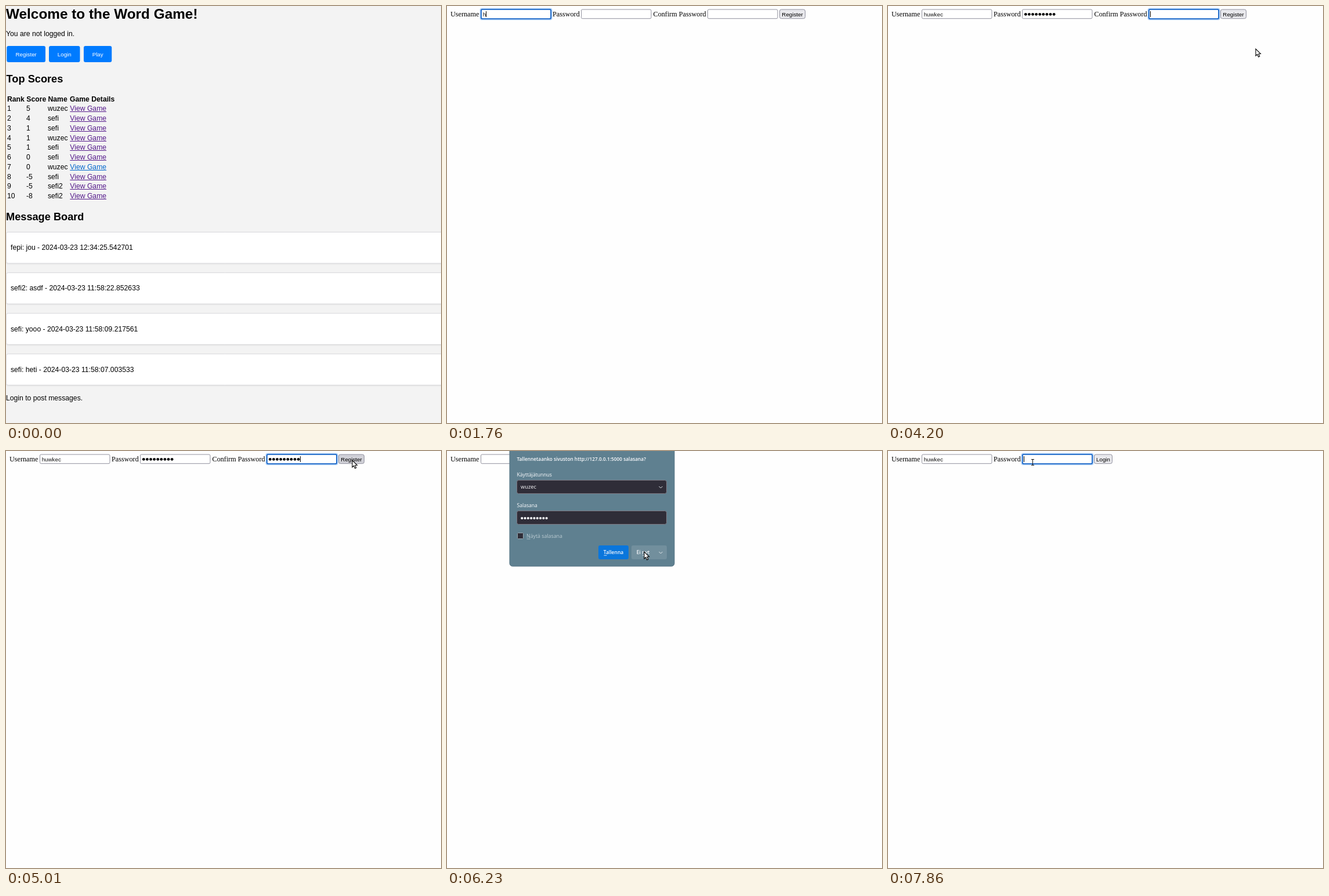
Recreate the animation shown at these times as an HTML page with a canvas. Size 750 px wide and 720 px high, loop 7990 ms.

```html
<!DOCTYPE html>
<html lang="en">
<head>
<meta charset="utf-8">
<title>Word Game</title>
<style>
html, body { margin: 0; width: 100%; height: 100%; overflow: hidden; background: #fefefe; }
canvas { display: block; }
</style>
</head>
<body>
<canvas id="stage" width="750" height="720"></canvas>
<script>
const ctx = document.getElementById('stage').getContext('2d');
const LOOP = 7990, STEP = LOOP / 59;

const sans = (px, weight = 400) => `${weight} ${px}px "Liberation Sans", Arial, sans-serif`;
const serif = px => `${px}px "Liberation Serif", "Times New Roman", serif`;
const ui = (px, weight = 400) => `${weight} ${px}px "Open Sans", "Noto Sans", sans-serif`;

const BODY = sans(12.2), BOLD = sans(12.2, 700), CONTROL = sans(9.75);
const USER = 'huwkec', SAVED = 'wuzec';
const SECRET = 9;

const scores = [
  [5, SAVED], [4, 'sefi'], [1, 'sefi'], [1, SAVED], [1, 'sefi'],
  [0, 'sefi'], [0, SAVED], [-5, 'sefi'], [-5, 'sefi2'], [-8, 'sefi2']
];
const messages = [
  'fepi: jou - 2024-03-23 12:34:25.542701',
  'sefi2: asdf - 2024-03-23 11:58:22.852633',
  'sefi: yooo - 2024-03-23 11:58:09.217561',
  'sefi: heti - 2024-03-23 11:58:07.003533'
];

// Pointer strokes as [time, x, y] stops; typing hides the pointer in between
const strokes = [
  [[140, 280, 30], [540, 40, 85], [940, 40, 85], [1210, 120, 122], [1350, 140, 16],
    [1410, 140, 16], [1620, 238, 72], [1750, 238, 72]],
  [[2430, 238, 72], [2700, 285, 16], [2760, 285, 16], [2900, 390, 76], [2970, 390, 76]],
  [[3780, 390, 76], [3980, 505, 16], [4050, 505, 16], [4200, 634, 74], [4320, 634, 74]],
  [[4730, 608, 40], [4870, 597, 16], [5600, 597, 16], [6080, 340, 174], [6260, 340, 174],
    [6500, 290, 76], [6760, 133, 23], [6800, 133, 23], [6860, 128, 16],
    [6910, 128, 16], [7030, 200, 70]],
  [[7440, 200, 70], [7700, 249, 19], [LOOP, 249, 19]]
];

function text(str, x, y, font, color = '#000', align = 'left') {
  ctx.font = font;
  ctx.fillStyle = color;
  ctx.textAlign = align;
  ctx.fillText(str, x, y);
  return ctx.measureText(str).width;
}

function box(x, y, w, h, r, fill, stroke, line = 1) {
  ctx.beginPath();
  ctx.roundRect(x, y, w, h, r);
  if (fill) {
    ctx.fillStyle = fill;
    ctx.fill();
  }
  if (stroke) {
    ctx.strokeStyle = stroke;
    ctx.lineWidth = line;
    ctx.stroke();
  }
}

function dots(count, x, y, pitch, r, color) {
  ctx.fillStyle = color;
  for (let i = 0; i < count; i++) {
    ctx.beginPath();
    ctx.arc(x + pitch * (i + 0.5), y, r, 0, 7);
    ctx.fill();
  }
}

function drawHome() {
  ctx.fillStyle = '#f3f3f3';
  ctx.fillRect(0, 0, 750, 720);
  text('Welcome to the Word Game!', 0, 22, sans(24.35, 700));
  text('You are not logged in.', 0, 52, BODY);
  for (const [label, x, w] of [['Register', 1.3, 66.7], ['Login', 74, 53.5], ['Play', 134, 48.3]]) {
    box(x, 69, w, 28, 3, '#007bff');
    text(label, x + w / 2, 87, CONTROL, '#fff', 'center');
  }

  text('Top Scores', 0.6, 132, sans(18.2, 700));
  [['Rank', 2], ['Score', 35.3], ['Name', 72.5], ['Game Details', 110]]
    .forEach(([label, x]) => text(label, x, 164.5, BOLD));
  scores.forEach(([score, name], i) => {
    const y = 181.4 + i * 16.76;
    const color = i === 6 ? '#0066cc' : '#551a8b';
    text(i + 1, 2, y, BODY);
    text(score, 35, y, BODY);
    text(name, 72, y, BODY);
    const w = text('View Game', 110.3, y, BODY, color);
    ctx.fillRect(110.3, Math.round(y + 1), w, 1);
  });

  text('Message Board', 0, 370, sans(18.2, 700));
  messages.forEach((line, i) => {
    const y = 390.5 + i * 70.1;
    ctx.save();
    ctx.shadowColor = 'rgba(0,0,0,.1)';
    ctx.shadowBlur = 3;
    ctx.shadowOffsetY = 1;
    box(0.5, y, 770, 53.7, 3, '#fff');
    ctx.restore();
    box(0.5, y, 770, 53.7, 3, null, '#d9d9dc');
    text(line, 8, y + 30.8, BODY);
  });
  text('Login to post messages.', 0, 681.3, BODY);
}

// value: a string, or a number of masked characters
function field(x, value, focused) {
  if (focused) {
    box(x - 1.6, 3.4, 125.2, 21.2, 4, '#b4d3f7');
    box(x + 0.9, 5.9, 120.2, 16.2, 2, '#fff', '#1463c6', 1.8);
  } else {
    box(x + 0.5, 6, 120.5, 15.7, 2, '#fff', '#92929e');
  }
  let end = x + 3.7;
  if (typeof value === 'number') {
    dots(value, end - 0.4, 14.3, 6.1, 2.4, '#000');
    end += value * 6.1 - 0.4;
  } else {
    end += text(value, end, 17.6, CONTROL, '#111');
  }
  if (focused) {
    ctx.fillStyle = '#000';
    ctx.fillRect(Math.round(end), 9, 1, 10);
  }
}

function button(label, x, w, hover) {
  box(x + 0.5, 6, w - 1, 15.7, 3, hover ? '#d0d0d7' : '#e9e9ed', '#8f8f9d');
  text(label, x + w / 2, 17.6, CONTROL, '#000', 'center');
}

function drawForm(user, pass, confirm, focus, hover) {
  const label = (str, x) => text(str, x, 18, serif(12.2));
  const full = confirm !== null;
  label('Username', 6);
  label('Password', 182);
  if (full) label('Confirm Password', 355.5);
  field(58, user, focus === 0);
  field(231, pass, focus === 1);
  if (full) {
    field(449, confirm, focus === 2);
    button('Register', 573, 45, hover);
  } else {
    button('Login', 355, 32, hover);
  }
}

function chevron(x, y) {
  ctx.beginPath();
  ctx.moveTo(x - 3, y - 1.5);
  ctx.lineTo(x, y + 1.5);
  ctx.lineTo(x + 3, y - 1.5);
  ctx.strokeStyle = '#e4eaed';
  ctx.lineWidth = 1;
  ctx.stroke();
}

function drawPrompt() {
  const white = '#fbfbfe', dark = '#2f2d38', dim = '#bccbd2', edge = '#7c7680';
  const rule = (x, y, w, color) => {
    ctx.fillStyle = color;
    ctx.fillRect(x, y, w, 0.8);
  };
  box(108, -10, 284, 209, 5, '#5f8090', '#547282');
  text('Tallennetaanko sivuston http://127.0.0.1:5000 salasana?', 120.5, 17, ui(8.3, 600), white);
  text('Käyttäjätunnus', 120.5, 44.3, ui(8.6), white);
  box(120.5, 50.5, 258, 23, 3, dark, edge);
  text(SAVED, 127, 65.4, ui(9.3), white);
  chevron(368.5, 62.5);
  text('Salasana', 120.5, 97.3, ui(8.6), white);
  box(120.5, 103.5, 258, 23, 3, dark, edge);
  dots(SECRET, 126.6, 116, 5.3, 2.1, white);
  box(121.5, 141.5, 10, 10, 1, dark, '#9aa9b1');
  text('Näytä salasana', 137, 150.2, ui(8.8), dim);
  rule(137.5, 151.5, 6, dim);
  box(261, 163, 52, 24, 3, '#0a76dc');
  text('Tallenna', 287, 178.4, ui(8.5, 600), white, 'center');
  rule(270.5, 179.8, 5, white);
  box(318, 163, 61, 24, 3, '#728f9d');
  text('Ei nyt', 338, 178.4, ui(8.5, 600), white, 'center');
  rule(337, 179.8, 5, white);
  chevron(368.5, 175.5);
}

function drawStatus() {
  box(-3, 712.5, 203.5, 20, 1, '#2b2a33', '#45434f');
  text('127.0.0.1', 3, 723, ui(8.8), '#fbfbfe');
}

function drawArrow(x, y) {
  const pts = [[0, 0], [0, 12], [2.7, 9.5], [4.7, 14], [6.8, 13], [4.9, 8.7], [8.5, 8.5]];
  ctx.beginPath();
  pts.forEach(([dx, dy]) => ctx.lineTo(x + dx, y + dy));
  ctx.closePath();
  ctx.fillStyle = '#fff';
  ctx.strokeStyle = '#000';
  ctx.lineWidth = 1.1;
  ctx.fill();
  ctx.stroke();
}

function drawBeam(x, y) {
  ctx.fillStyle = '#111';
  ctx.fillRect(x, y - 5, 1, 11);
  for (const dy of [-5, 5]) ctx.fillRect(x - 2, y + dy, 5, 1);
}

function drawPointer(t, fields) {
  const stops = strokes.find(s => t >= s[0][0] && t < s[s.length - 1][0]);
  if (!stops) return;
  const i = stops.findIndex(s => s[0] > t);
  const [t0, x0, y0] = stops[i - 1], [t1, x1, y1] = stops[i];
  const p = (t - t0) / (t1 - t0), k = p * p * (3 - 2 * p);
  const x = Math.round(x0 + (x1 - x0) * k), y = Math.round(y0 + (y1 - y0) * k);
  const inField = y > 5 && y < 22 && fields.some(left => x >= left && x < left + 121);
  (inField ? drawBeam : drawArrow)(x, y);
}

// Characters entered by time t
const typed = (t, start, gap, max) =>
  Math.max(0, Math.min(max, Math.floor((t - start) / gap) + 1));

// Index of the field clicked last
const lastClick = (t, clicks) => clicks.filter(c => t >= c).length - 1;

function draw(t) {
  const home = t < 805, register = !home && t < 5680, prompt = t >= 5400 && t < 6350;
  ctx.fillStyle = '#fefefe';
  ctx.fillRect(0, 0, 750, 720);
  if (home) {
    drawHome();
  } else if (register) {
    const pass = typed(t, 2970, 130, 3) + typed(t, 3370, 65, SECRET - 3);
    drawForm(USER.slice(0, typed(t, 1750, 110, 6)), pass, typed(t, 4320, 50, SECRET),
      prompt ? -1 : lastClick(t, [1350, 2700, 3980]), t >= 4860);
  } else {
    drawForm(USER.slice(0, typed(t, 7030, 75, 6)), 0, null, lastClick(t, [6890, 7710]), false);
  }
  if (prompt) {
    if (register) drawStatus();
    ctx.globalAlpha = Math.min(1, (t - 5300) / 200);
    drawPrompt();
    ctx.globalAlpha = 1;
  }
  drawPointer(t, home ? [] : register ? [58, 231, 449] : [58, 231]);
}

function tick() {
  const t = performance.now() % LOOP;
  draw(Math.min(58, Math.floor((t + 5) / STEP)) * STEP);
  requestAnimationFrame(tick);
}
tick();
</script>
</body>
</html>
```
